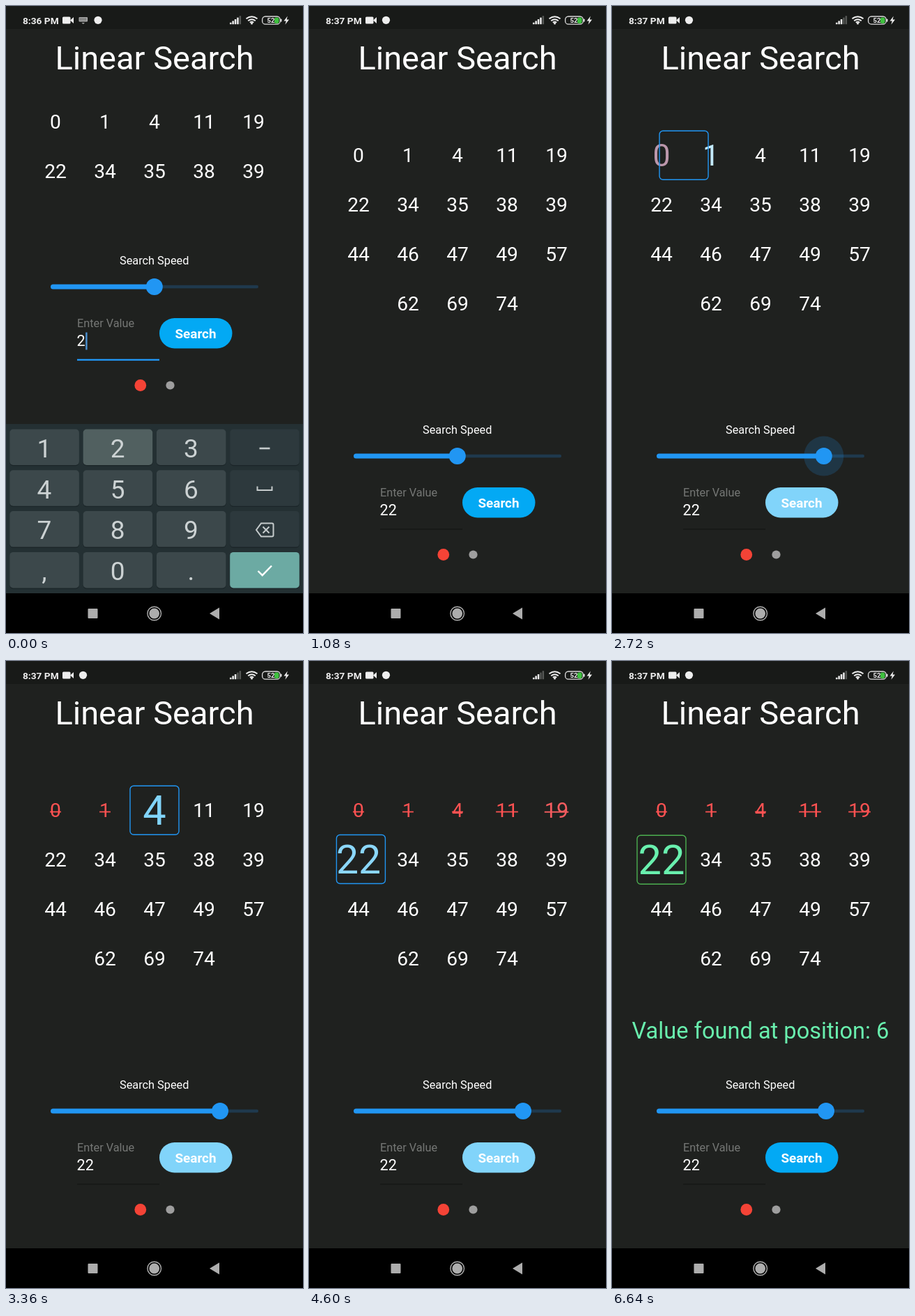
Recreate the animation shown at these times as an HTML page. Size 426 by 900 pixels, loop 6680 ms.

```html
<!DOCTYPE html>
<html lang="en">
<head>
<meta charset="utf-8">
<title>Linear Search</title>
<style>
  html, body { margin: 0; width: 100%; height: 100%; overflow: hidden; background: #1f211f; }
  svg { display: block; width: 100vw; height: 100vh; font-family: Roboto, sans-serif; fill: #fff; }
  .mid { text-anchor: middle; }
  .line { fill: none; stroke: #c5cbcc; stroke-width: 2; }
</style>
</head>
<body>
<svg viewBox="0 0 426 900">
  <defs><clipPath id="listClip"><rect id="listArea" y="130" width="426" height="380"/></clipPath></defs>
  <rect width="426" height="900" fill="#1f211f"/>

  <text class="mid" x="213" y="91" font-size="47">Linear Search</text>
  <g clip-path="url(#listClip)">
    <g id="list">
      <g id="cells"></g>
      <rect id="box" width="70" height="70" rx="5" fill="none" stroke-width="1.4"/>
    </g>
  </g>

  <g id="panel">
    <text id="found" class="mid" x="213" y="542" font-size="32.6" fill="#69f0ae">Value found at position: 6</text>
    <text class="mid" x="212.7" y="614" font-size="16.3">Search Speed</text>
    <rect x="64" y="643.7" width="298" height="4.6" rx="2.3" fill="#1f394d"/>
    <rect id="track" x="64" y="642.5" height="7" rx="3.5" fill="#2196f3"/>
    <circle id="halo" cy="646" fill="#2196f3" fill-opacity=".18"/>
    <circle id="thumb" cy="646" r="12" fill="#2196f3"/>
    <text x="102" y="704" font-size="16.3" fill="#757775">Enter Value</text>
    <text id="entry" x="101.6" y="731" font-size="21.7"></text>
    <rect id="cursor" y="711.5" width="2.4" height="25" fill="#4a90d0"/>
    <rect id="underline" x="102" width="118"/>
    <rect id="button" x="220" y="691" width="104.5" height="43.4" rx="21.7"/>
    <text class="mid" x="272" y="719.5" font-size="18.9" font-weight="600">Search</text>
    <circle cx="192.8" cy="787.5" r="8.4" fill="#f44336"/>
    <circle cx="235.5" cy="787.5" r="6.1" fill="#9e9e9e"/>
  </g>

  <g id="keyboard">
    <rect y="600" width="426" height="244" fill="#243033"/>
    <g id="keys"></g>
    <rect x="363.5" y="633.7" width="15" height="2.6" fill="#c5cbcc"/>
    <path class="line" d="M360.5 689.5v5.5h21v-5.5"/>
    <path class="line" d="M366 742.5h15.5q2 0 2 2v15q0 2-2 2H366l-7-9.5zM368.5 747.5l9 9m0-9l-9 9"/>
    <path class="line" style="stroke:#fff;stroke-width:2.4" d="M361.5 811l6.2 6.2L381 803.5"/>
  </g>

  <rect y="843" width="426" height="57" fill="#000"/>
  <g fill="#adadad">
    <rect x="117.5" y="865" width="14" height="14" rx="1"/>
    <circle cx="212.7" cy="872" r="7.4"/>
    <circle cx="212.7" cy="872" r="9.8" fill="none" stroke="#adadad" stroke-width="1.4"/>
    <path d="M292 872l14-8.5v17z"/>
  </g>

  <rect width="426" height="33" fill="#181a18"/>
  <text id="clock" x="24" y="25.6" font-size="13.7" font-weight="700" fill="#eee"></text>
  <g fill="#eee">
    <rect x="81" y="15.5" width="11.5" height="10" rx="1.5"/>
    <path d="M92 20.5l5-4.5v9z"/>
    <g id="keysIcon">
      <rect x="104.5" y="16" width="12.5" height="6.5" rx="1" fill="#aaa"/>
      <path d="M106 18h10M106 20h10" stroke="#181a18" stroke-dasharray="1 1"/>
      <path d="M108.5 24h4.5l-2.2 2z" fill="#aaa"/>
    </g>
    <circle id="badge" cy="20.3" r="5.6"/>
    <g id="signal"></g>
    <g fill="none" stroke="#eee" stroke-width="1.9">
      <path d="M344.5 18.3q8-6.3 16 0M347.2 21.2q5.3-4 10.6 0M349.8 23.8q2.7-2 5.4 0"/>
    </g>
    <circle cx="352.5" cy="25.2" r="1.4"/>
    <rect x="385" y="16.5" width="6.5" height="8.4" rx="2" fill="#3fc13f"/>
    <rect x="367.6" y="15" width="25.6" height="11.2" rx="4.5" fill="none" stroke="#ddd" stroke-width="1.3"/>
    <rect x="393.8" y="18.5" width="1.6" height="4.2" rx=".8"/>
    <text class="mid" x="380" y="24" font-size="9.5" font-weight="700">52</text>
    <path d="M403.8 14.5l-5.3 7h3.3l-1.4 5.2 5.6-7.2h-3.4z"/>
  </g>
</svg>
<script>
const LOOP = 6680, STEP = 430, GROW = 356, SMALL = 28.2, LARGE = 59.6;
const FIRST = 1780, MOVE = 2553, FOUND = MOVE + 5 * STEP;
const CLOSE = 840, TYPE = 420, TAP = 1740;
const PITCH = 71, HIT = 5;
const values = [0, 1, 4, 11, 19, 22, 34, 35, 38, 39, 44, 46, 47, 49, 57, 62, 69, 74];
const WHITE = [255, 255, 255], SKY = [129, 212, 250], RED = [255, 82, 82], MINT = [105, 240, 174];

const $ = id => document.getElementById(id);
const set = (el, attrs) => { for (const k in attrs) el.setAttribute(k, attrs[k]); };
const add = (parent, tag, attrs, text = '') => {
  const el = document.createElementNS(parent.namespaceURI, tag);
  set(el, attrs);
  el.textContent = text;
  return parent.appendChild(el);
};
const ramp = (t, start, length) => Math.min(1, Math.max(0, (t - start) / length));
const mix = (a, b, p) => a + (b - a) * p;
const blend = (a, b, p) => `rgb(${a.map((v, i) => Math.round(mix(v, b[i], p)))})`;
const show = (id, on) => set($(id), { visibility: on ? 'visible' : 'hidden' });

// Cubic bezier (.42, 0, .58, 1), solved by bisection.
function easeInOut(x) {
  let lo = 0, hi = 1, u = .5;
  for (let i = 0; i < 20; i++) {
    u = (lo + hi) / 2;
    const bx = 3 * (1 - u) * (1 - u) * u * .42 + 3 * (1 - u) * u * u * .58 + u ** 3;
    if (bx < x) lo = u; else hi = u;
  }
  return u * u * (3 - 2 * u);
}

const slot = i => ({ x: 71 + PITCH * (i % 5 + (i > 14 ? 1 : 0)), y: 214.3 + PITCH * Math.floor(i / 5) });
const cells = values.map((value, i) => {
  const { x } = slot(i);
  return {
    text: add($('cells'), 'text', { class: 'mid', x }, value),
    strike: add($('cells'), 'rect', {}),
    digits: String(value).length
  };
});

const keys = ['1', '2', '3', '', '4', '5', '6', '', '7', '8', '9', '', ',', '0', '.', ''].map((label, i) => {
  const x = 5.3 + 105.3 * (i % 4), y = 607.5 + 58.8 * Math.floor(i / 4);
  add($('keys'), 'rect', { x, y: y + 1, width: 99.6, height: 51.8, rx: 5, fill: '#1b2528' });
  const key = add($('keys'), 'rect', { x, y, width: 99.6, height: 51.5, rx: 5 });
  add($('keys'), 'text', { class: 'mid', x: x + 49.5, y: y + 40.3, 'font-size': 37, fill: '#ccd2d3' }, label);
  return key;
});
const bars = [0, 1, 2, 3, 4].map(i =>
  add($('signal'), 'rect', { x: 321 + 3.4 * i, y: 23.8 - 2.4 * i, width: 2.5, height: 2.4 + 2.4 * i }));

function drawCell(cell, i, t) {
  const { x, y } = slot(i);
  const growth = i === 0 ? ramp(t, FIRST, 620) : i <= HIT ? ramp(t, MOVE + (i - 1) * STEP, GROW) : 0;
  const after = i <= HIT ? ramp(t, MOVE + i * STEP, GROW) : 0;
  const missed = i < HIT ? after : 0;
  const size = mix(SMALL, LARGE, growth - missed);
  const fill = after > 0 ? blend(SKY, i === HIT ? MINT : RED, after) : blend(WHITE, SKY, growth);
  const baseline = y + .348 * size, width = cell.digits * .5615 * size;
  set(cell.text, { y: baseline, 'font-size': size, fill });
  set(cell.strike, {
    x: x - width / 2, y: baseline - .3 * size, width, height: .062 * size, fill,
    visibility: missed >= .5 ? 'visible' : 'hidden'
  });
}

function drawBox(t) {
  const step = Math.min(HIT - 1, Math.max(0, Math.floor((t - MOVE) / STEP)));
  const p = easeInOut(ramp(t, MOVE + step * STEP, GROW));
  const from = slot(step), to = slot(step + 1);
  set($('box'), {
    x: mix(from.x, to.x, p) - 35, y: mix(from.y, to.y, p) - 35,
    stroke: blend([33, 150, 243], [76, 175, 80], ramp(t, FOUND, GROW))
  });
  show('box', t >= FIRST);
}

function drawSlider(t) {
  const x = 212.8 + 91 * easeInOut(ramp(t, 2080, 580)) + 3.2 * ramp(t, 2740, 120);
  set($('track'), { width: x - 64 });
  set($('thumb'), { cx: x });
  set($('halo'), { cx: x, r: 28.5 * (ramp(t, 2000, 120) - ramp(t, 2900, 120)) });
}

function drawForm(t, open) {
  const busy = t >= TAP && t < FOUND, typed = t >= TYPE;
  $('entry').textContent = typed ? '22' : '2';
  set($('cursor'), { x: typed ? 126.4 : 114.2 });
  show('cursor', open);
  set($('underline'), open
    ? { y: 749.7, height: 2.4, fill: '#2196f3' }
    : { y: 750.4, height: 1.2, fill: '#151715' });
  set($('button'), { fill: busy ? '#81d4fa' : '#03a9f4' });
  show('found', t >= FOUND);
}

function drawKeyboard(t) {
  const pressed = t < 340 || (t >= TYPE && t < 540) ? 1 : t >= 700 && t < 800 ? 15 : -1;
  keys.forEach((key, i) => {
    const idle = i === 15 ? '#6caaa3' : i % 4 === 3 ? '#2d393d' : '#3c484b';
    set(key, { fill: i !== pressed ? idle : i === 15 ? '#83bbb4' : '#516060' });
  });
  const p = ramp(t, CLOSE, 200);
  set($('keyboard'), { transform: `translate(0 ${244 * p * p})` });
  show('keyboard', p < 1);
}

function drawStatus(t, open) {
  $('clock').textContent = open ? '8:36 PM' : '8:37 PM';
  show('keysIcon', open);
  set($('badge'), { cx: open ? 132 : 110.5 });
  const strength = t >= 1800 && t < 5000 ? 3 : 4;
  bars.forEach((bar, i) => set(bar, { fill: i < strength ? '#eee' : '#555755' }));
}

function draw(t) {
  const open = t < CLOSE + 60, inset = open ? 243 : 0;
  set($('listArea'), { height: 380 - inset });
  set($('list'), { transform: `translate(0 ${open ? -48.6 : 0})` });
  set($('panel'), { transform: `translate(0 ${-inset})` });
  cells.forEach((cell, i) => drawCell(cell, i, t));
  drawBox(t);
  drawSlider(t);
  drawForm(t, open);
  drawKeyboard(t);
  drawStatus(t, open);
}

const start = performance.now();
function frame() {
  draw((performance.now() - start) % LOOP);
  requestAnimationFrame(frame);
}
frame();
</script>
</body>
</html>
```
